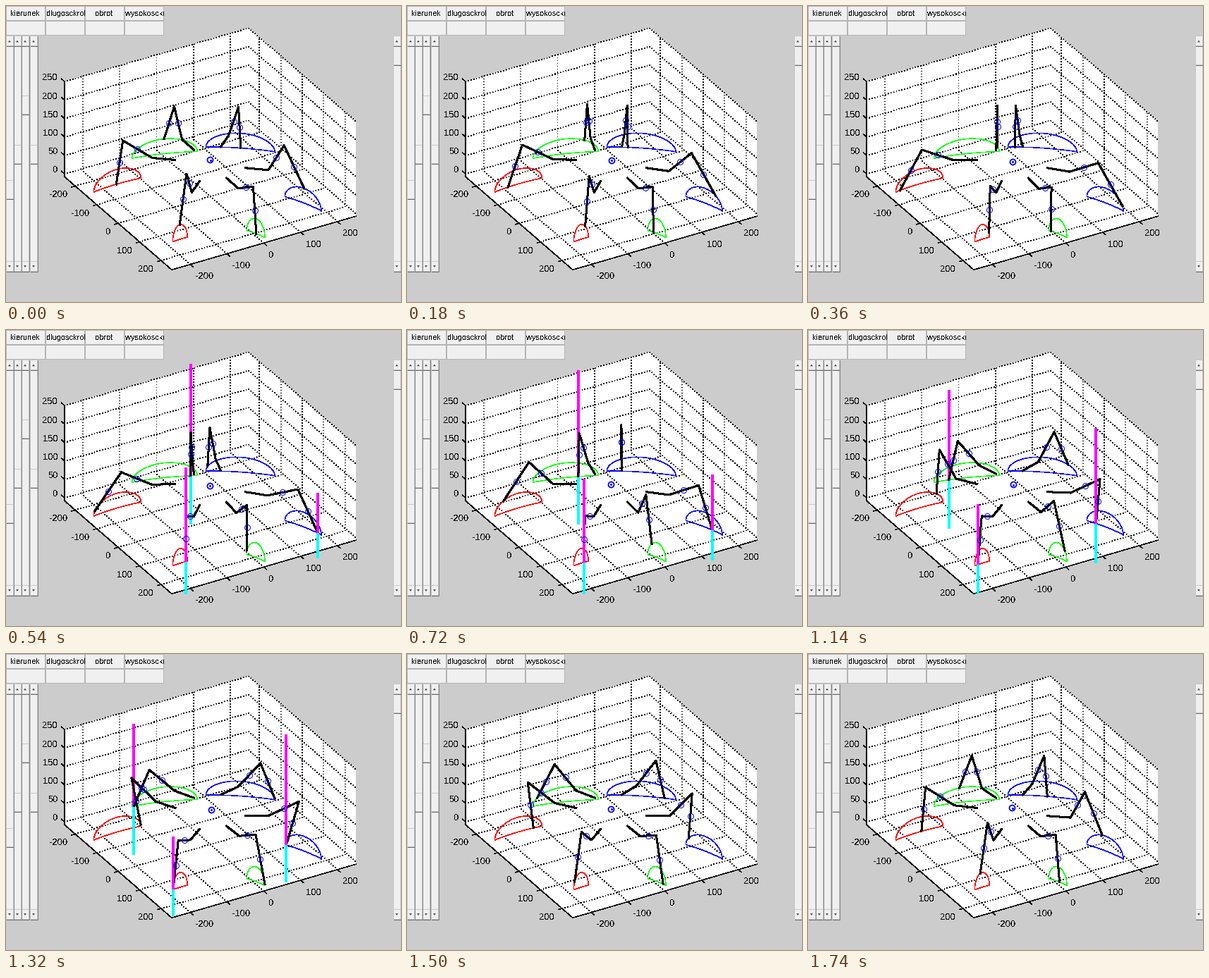
Animation of 560 by 420 pixels, one loop 1.8 s. Source, as a matplotlib script:

```python
import numpy as np
import matplotlib.pyplot as plt
from matplotlib.animation import FuncAnimation
from matplotlib.patches import Polygon, Rectangle

W, H, DPI = 560, 420, 100
PT = 72 / DPI
FRAMES, STEP = 30, 60
plt.rcParams["font.family"] = "Liberation Sans"

fig = plt.figure(figsize=(W / DPI, H / DPI), dpi=DPI, facecolor="#cccccc")
ax = fig.add_axes([0, 0, 1, 1])
ax.set(xlim=(0, W), ylim=(H, 0))
ax.axis("off")

# orthographic view: pixels per unit along each axis
VIEW = np.array([[0.522, -0.152], [0.304, 0.264], [0, -0.524]])
ORIGIN = np.array([289.5, 266.3])
LIM, ZMIN, ZMAX = 250, -7.6, 250
HAIR = 0.5  # unsmoothed strokes fill every pixel they touch


def project(points):
    return np.asarray(points, float) @ VIEW + ORIGIN


def line(pts, color="k", width=HAIR, z=2, **kw):
    pts = np.asarray(pts)
    return ax.plot(pts[:, 0], pts[:, 1], color=color, lw=width * PT,
                   antialiased=False, zorder=z, **kw)[0]


def label(x, y, text, size=13, ha="left"):
    return ax.text(x, y, text, size=size * PT, ha=ha, va="baseline",
                   antialiased=False, zorder=3, clip_on=True)


def box(x, y, w, h, face, edge):
    patch = Rectangle((x, y), w, h, fc=edge, ec="none",
                      antialiased=False, zorder=2)
    ax.add_patch(patch)
    ax.add_patch(Rectangle((x + 1, y + 1), w - 2, h - 2, fc=face, ec="none",
                           antialiased=False, zorder=2))
    return patch


# ---- axes box ----
def draw_axes():
    outline = [(-LIM, -LIM, ZMAX), (LIM, -LIM, ZMAX), (LIM, LIM, ZMAX),
               (LIM, LIM, ZMIN), (-LIM, LIM, ZMIN), (-LIM, -LIM, ZMIN)]
    ax.add_patch(Polygon(project(outline), fc="w", ec="none", zorder=0))

    def grid(*pts):
        line(project(pts), z=1, linestyle=(0, (1, 7)), dash_capstyle="butt")

    def tick(point, step):
        p = project(point)
        line([p, p + step])
        return p

    for t in range(-200, 201, 100):
        grid((t, LIM, ZMIN), (t, -LIM, ZMIN), (t, -LIM, ZMAX))
        grid((-LIM, t, ZMIN), (LIM, t, ZMIN), (LIM, t, ZMAX))
        x, y = tick((t, LIM, ZMIN), (4, 3.5))
        label(x + 7, y + 20.5, str(t))
        x, y = tick((-LIM, t, ZMIN), (-5, 1.5))
        label(x - 10.5, y + 16, str(t), ha="right")
    for t in range(0, 251, 50):
        grid((-LIM, -LIM, t), (LIM, -LIM, t), (LIM, LIM, t))
        x, y = tick((-LIM, -LIM, t), (-4.5, -4))
        label(x - 9.5, y - 2, str(t), ha="right")
    line(project([(-LIM, -LIM, ZMAX), (-LIM, -LIM, ZMIN),
                  (-LIM, LIM, ZMIN), (LIM, LIM, ZMIN)]))


# ---- control panel ----
def arrow(x, y, d):
    ax.add_patch(Polygon([(x - 2, y + d), (x + 2, y + d), (x, y - d)],
                         fc="#404040", ec="none", zorder=3))


def slider(x, thumb):
    box(x, 42, 11, 335, "#f0f0f0", "#c8c8c8")
    for y, h in ((42, 15), (362, 15), (thumb, 27)):
        box(x, y, 11, h, "#f0f0f0", "#c8c8c8")
        line([(x + 0.5, y + h - 0.5), (x + 10.5, y + h - 0.5)],
             "#696969", z=2.5)
    line([(x + 10.5, 42.5), (x + 10.5, 376.5)], "#808080", z=2.5)
    arrow(x + 5, 50, 1.3)
    arrow(x + 5, 369.5, -1.3)


def draw_panel():
    names = ["kierunek", "dlugosckroku", "obrot", "wysokosckroku"]
    for i, name in enumerate(names):
        cell = box(56 * i, 0, 56, 21, "#f0f0f0", "#b4b4b4")
        box(56 * i, 21, 56, 21, "#f0f0f0", "#b4b4b4")
        if len(name) > 8:
            text = label(56 * i + 1.5, 14, name, 11)
        else:
            text = label(56 * i + 27, 14, name, 11, "center")
        text.set_clip_path(cell)
    for x, thumb in ((0, 247), (11, 197), (22, 127), (34, 197), (549, 57)):
        slider(x, thumb)


# ---- robot ----
BODY_Z, COXA, FEMUR, TIBIA = 80.5, 55, 80, 121
PIVOT = np.array([-165, 284])
SWEEP, LIFT = 0.15, 40
GREEN = "#00ff00"

# hip, resting foot, path colour, tripod
LEGS = [((0, -76), (0, -215), GREEN, 0),
        ((62, 57), (169, 148), "b", 0),
        ((-62, 57), (-169, 148), "r", 0),
        ((62, -57), (169, -148), "b", 1),
        ((-62, -57), (-169, -148), "r", 1),
        ((0, 76), (0, 215), GREEN, 1)]


def foot_at(rest, phase):
    """Phase 0..1 pushes along the ground, 1..2 swings back in the air."""
    if phase < 1:
        turn, z = SWEEP * (1 - 2 * phase), 0
    else:
        u = np.pi * (phase - 1)
        turn, z = -SWEEP * np.cos(u), LIFT * np.sin(u)
    c, s = np.cos(turn), np.sin(turn)
    x, y = np.array(rest) - PIVOT
    return np.array([PIVOT[0] + c * x - s * y, PIVOT[1] + s * x + c * y, z])


def solve_leg(hip, foot):
    hip = np.array([*hip, BODY_Z])
    reach = np.hypot(*(foot - hip)[:2])
    out = np.array([*(foot - hip)[:2] / reach, 0])
    r, dz = reach - COXA, foot[2] - BODY_Z
    d = np.hypot(r, dz)
    bend = np.arccos((d * d + FEMUR**2 - TIBIA**2) / (2 * d * FEMUR))
    a = np.arctan2(dz, r) + bend
    joint = hip + COXA * out
    knee = joint + FEMUR * (np.cos(a) * out + np.array([0, 0, np.sin(a)]))
    return np.array([hip, joint, knee, foot])


def draw_paths():
    for _, rest, color, _ in LEGS:
        loop = [foot_at(rest, p) for p in np.linspace(0, 2, 81)]
        line(project(loop), color)


draw_axes()
draw_panel()
draw_paths()

EMPTY = np.zeros((0, 2))
RING = dict(marker="o", ms=8 * PT, mfc="none", mec="b", linestyle="none")


def force_bars(color):
    # the rear leg hides its bar, the front ones are hidden by theirs
    return [line(EMPTY, color, 4, 4 if rest[1] < 0 else 5.5,
                 solid_capstyle="butt") for _, rest, _, _ in LEGS[:3]]


up, down = force_bars("#ff00ff"), force_bars("#00ffff")
limbs = [line(EMPTY, "k", 2, 5, solid_joinstyle="round") for _ in LEGS]
mids = line(EMPTY, "b", 1, 6, mew=PT, **RING)
mass = line(EMPTY, "b", 1, 6, mew=1.8 * PT, **RING)
core = ax.plot([], [], "o", color="b", ms=3 * PT, mew=0, zorder=6)[0]

LOAD = 349
KEYS = [9, 15, 19, 22]
DROP = [[69, 67, 69, 69], [36, 50, 56, 53], [46, 44, 41, 38]]


def update(f):
    legs = []
    for hip, rest, _, tripod in LEGS:
        phase = (f - 7.5 + 15 * tripod) % FRAMES / 15
        legs.append(solve_leg(hip, foot_at(rest, phase)))
    for art, leg in zip(limbs, legs):
        art.set_data(*project(leg).T)

    links = np.array([(leg[i] + leg[i + 1]) / 2 for leg in legs for i in (1, 2)])
    mids.set_data(*project(links).T)
    body = np.array([0, 0, BODY_Z])
    com = body + 0.4 * (links.mean(axis=0) - body)
    center = project(com + [0, 0, 6])
    mass.set_data(*center[:, None])
    core.set_data([center[0] + 0.5], [center[1] + 0.3])

    # share the weight between the three standing feet
    feet = np.array([leg[3] for leg in legs[:3]])
    share = np.linalg.solve(np.vstack([feet[:, :2].T, np.ones(3)]),
                            [com[0], com[1], 1])
    loaded = 8 <= f <= 22
    for i, (x, y) in enumerate(project(feet)):
        low = min(y + np.interp(f, KEYS, DROP[i]), 375)
        up[i].set_data([x, x], [y - LOAD * share[i], y])
        down[i].set_data([x, x], [y, low])
        up[i].set_visible(loaded)
        down[i].set_visible(loaded)
    return [*up, *down, *limbs, mids, mass, core]


anim = FuncAnimation(fig, update, frames=FRAMES, interval=STEP,
                     repeat=True, repeat_delay=0, blit=False)
plt.show()
```
